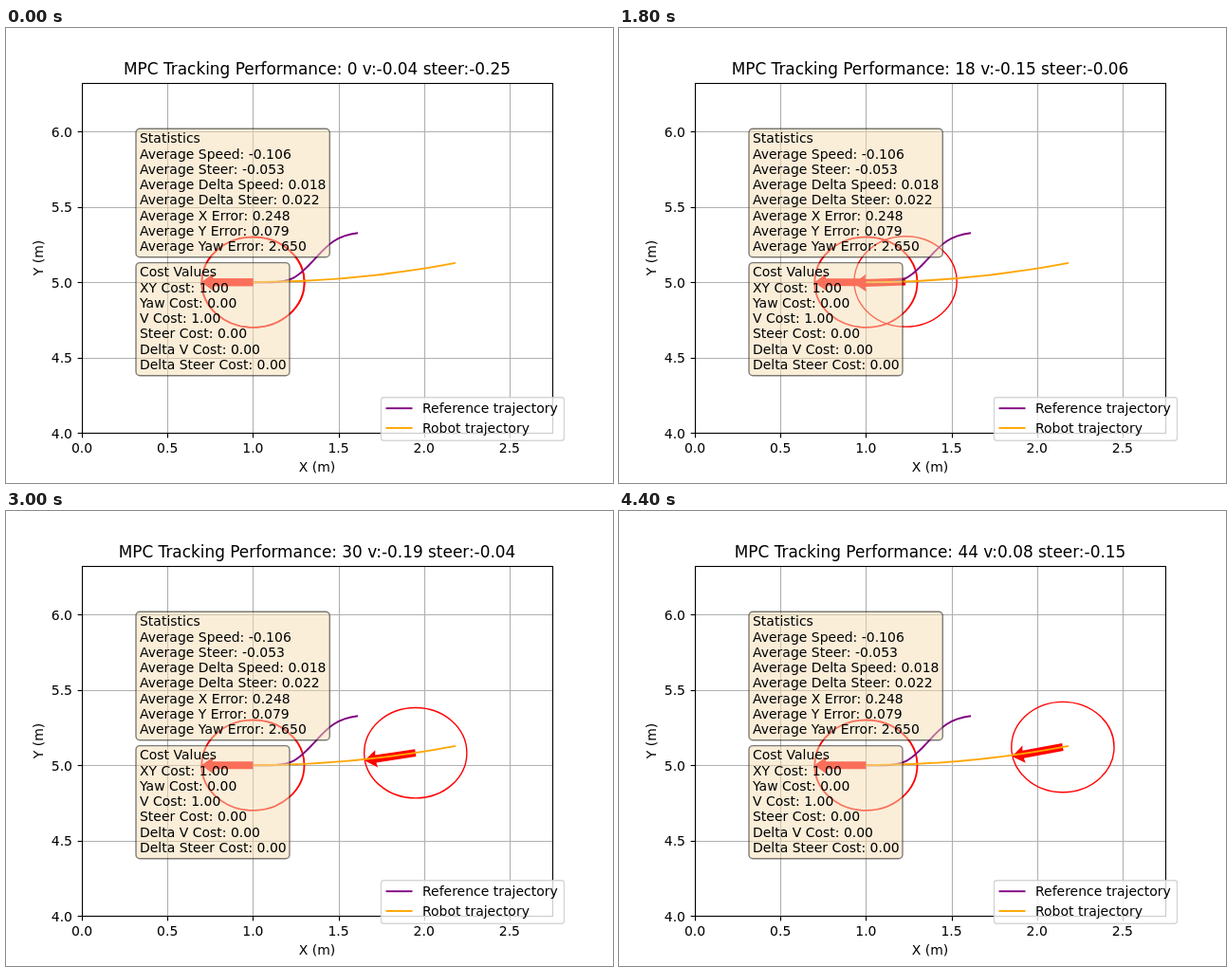
Animation, 640 px wide and 480 px high, one loop 4500 ms. Source, as an HTML page:

```html
<!DOCTYPE html>
<html lang="en">
<head>
<meta charset="utf-8">
<title>MPC Tracking</title>
<style>
  html, body { margin: 0; width: 100%; height: 100%; overflow: hidden; background: #fff; }
  svg { display: block; }
  text { font: 13.97px "DejaVu Sans", sans-serif; white-space: pre; }
  #title { font-size: 16.9px; }
  .mid { text-anchor: middle; }
  .end { text-anchor: end; }
  .line { fill: none; stroke-width: 1.9; }
  .ring { fill: none; stroke: red; }
  .note { fill: wheat; fill-opacity: .5; stroke: #000; stroke-opacity: .5; stroke-width: 1.39; }
</style>
</head>
<body>
<svg width="640" height="480" viewBox="0 0 640 480">
  <defs>
    <path id="arrow" fill="red" d="M0-4H-42.5L-41.5-9.3L-54.5 0L-41.5 9.3L-42.5 4H0Z"/>
  </defs>
  <g id="grid" stroke="#b0b0b0" stroke-width="1.11"></g>
  <ellipse class="ring" cx="260.4" cy="268.2" rx="54.1" ry="47.7" stroke-width="1.8"/>
  <use href="#arrow" x="260.4" y="268.2"/>
  <g id="robot">
    <ellipse class="ring" rx="54.1" ry="47.7" stroke-width="1.4"/>
    <use id="heading" href="#arrow"/>
  </g>
  <path class="line" stroke="purple" d="M260.4 268.2H278C300 268 307 263.5 322 247.5S346 219 371 216.3"/>
  <path class="line" stroke="orange" d="M260.4 268.2Q367.2 268.2 474 247.9"/>
  <rect x="80.5" y="58.5" width="496" height="369" fill="none" stroke="#000" stroke-width="1.11"/>
  <g id="ticks" stroke="#000" stroke-width="1.11"></g>
  <g id="labels"></g>
  <text class="mid" x="328" y="468">X (m)</text>
  <text class="mid" transform="translate(39 242.5) rotate(-90)">Y (m)</text>
  <rect class="note" x="137" y="106.2" width="204.3" height="135.6" rx="4.2"/>
  <rect class="note" x="137" y="247.6" width="162" height="119.2" rx="4.2"/>
  <g id="notes"></g>
  <rect x="395.5" y="389.7" width="193" height="45.6" rx="2.8" fill="#fff" fill-opacity=".8" stroke="#ccc" stroke-opacity=".8" stroke-width="1.39"/>
  <path class="line" stroke="purple" d="M400.5 401.2H428.5"/>
  <path class="line" stroke="orange" d="M400.5 422H428.5"/>
  <text x="439" y="406.2">Reference trajectory</text>
  <text x="439" y="427">Robot trajectory</text>
  <text id="title" class="mid" x="328" y="49"></text>
</svg>
<script>
const $ = id => document.getElementById(id);
const add = (id, markup) => $(id).insertAdjacentHTML('beforeend', markup);
const snap = v => Math.round(v) + .5;

for (let i = 0; i < 6; i++) {
  const x = 80 + i * 90.18;
  if (i) add('grid', `<path d="M${snap(x)} 58V427"/>`);
  add('ticks', `<path d="M${snap(x)} 428v4.4"/>`);
  add('labels', `<text class="mid" x="${x}" y="447.6">${(i / 2).toFixed(1)}</text>`);
}
for (let i = 0; i < 5; i++) {
  const y = 427.2 - i * 79.5;
  if (i) add('grid', `<path d="M81 ${snap(y)}H576"/>`);
  add('ticks', `<path d="M80 ${snap(y)}h-4.4"/>`);
  add('labels', `<text class="end" x="70" y="${y + 5.3}">${(4 + i / 2).toFixed(1)}</text>`);
}

const note = (y, lines) => lines.forEach((s, i) =>
  add('notes', `<text x="141" y="${y + i * 16.25}">${s}</text>`));
note(121.3, ['Statistics', 'Average Speed: -0.106', 'Average Steer: -0.053',
  'Average Delta Speed: 0.018', 'Average Delta Steer: 0.022',
  'Average X Error: 0.248', 'Average Y Error: 0.079', 'Average Yaw Error: 2.650']);
note(262.4, ['Cost Values', 'XY Cost: 1.00', 'Yaw Cost: 0.00', 'V Cost: 1.00',
  'Steer Cost: 0.00', 'Delta V Cost: 0.00', 'Delta Steer Cost: 0.00']);

// Control inputs as [step, value] key points, linear in between
const speedKeys = [[0, -.036], [12, -.03], [14, -.05], [22, -.254], [26, -.264],
  [34, -.12], [38, -.02], [41, .015], [44, .08]];
const steerKeys = [[0, -.25], [7, -.02], [14, -.02], [22, -.1], [26, -.04], [34, -.04], [44, -.15]];

function lerp(keys, t) {
  const i = Math.max(1, keys.findIndex(k => k[0] >= t));
  const [[t0, a], [t1, b]] = [keys[i - 1], keys[i]];
  return a + (b - a) * (t - t0) / (t1 - t0);
}
const speed = t => lerp(speedKeys, t);
const steer = t => lerp(steerKeys, t);

// The robot faces left and its position is the summed speed
const robotX = [260.7];
for (let t = 1; t < 45; t++) robotX[t] = robotX[t - 1] - 47 * (speed(t - 1) + speed(t)) / 2;

const bend = 20.3 / 213.6 ** 2;
const round = v => Math.round(v * 100) / 100 || 0;

function draw(now) {
  const step = Math.floor(now % 4500 / 100), x = robotX[step], run = x - 260.4;
  const yaw = Math.atan(2 * bend * run) * 180 / Math.PI;
  $('robot').setAttribute('transform', `translate(${x} ${268.2 - bend * run * run})`);
  $('heading').setAttribute('transform', `rotate(${-yaw})`);
  $('title').textContent = `MPC Tracking Performance: ${step} v:${round(speed(step))} steer:${round(steer(step))}`;
}
const start = performance.now();
function loop() {
  draw(performance.now() - start);
  requestAnimationFrame(loop);
}
loop();
</script>
</body>
</html>
```
